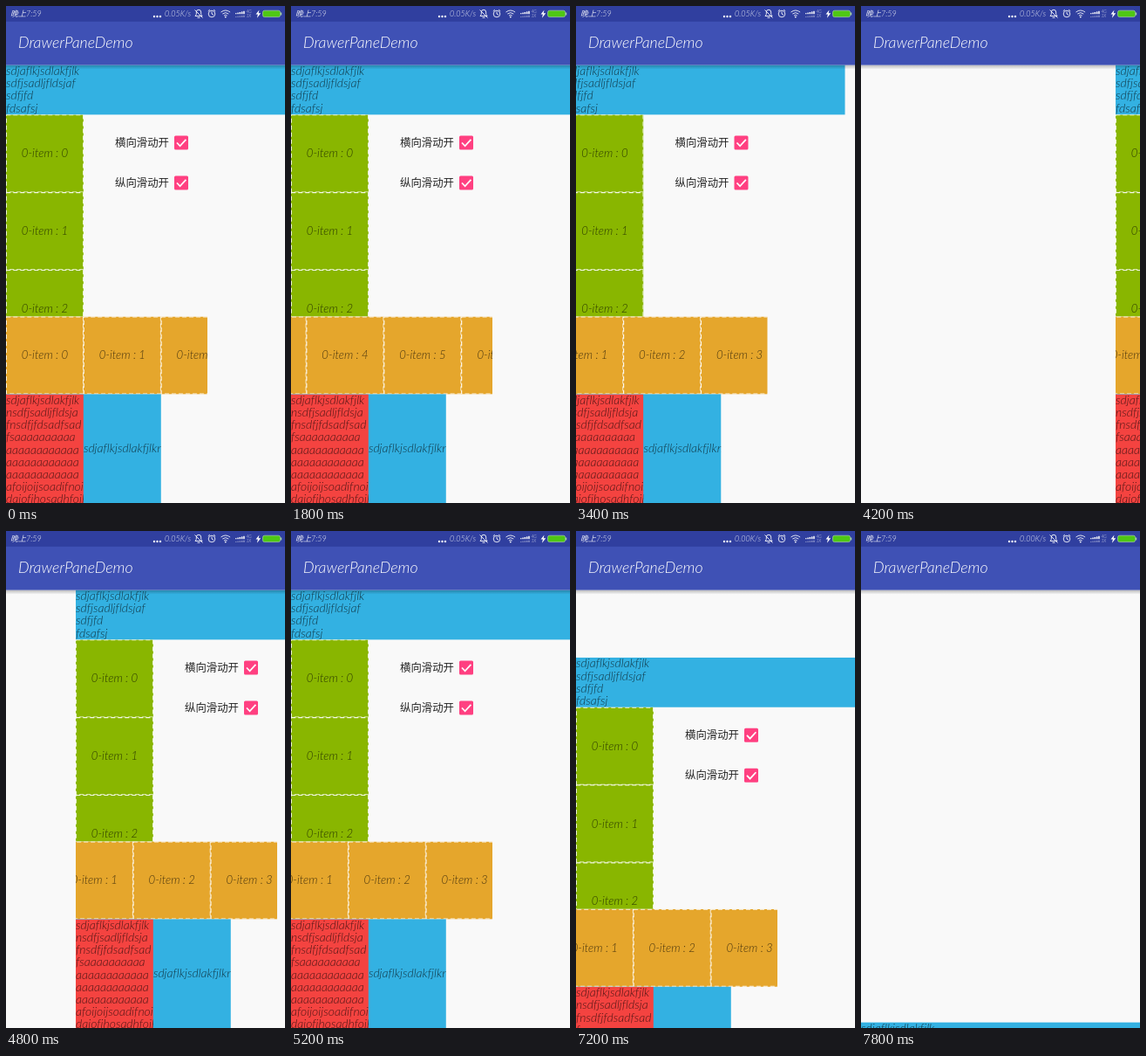
An HTML page that plays this animation: 320x569 px, repeating every 8 s.

```html
<!DOCTYPE html>
<html lang="zh">
<head>
<meta charset="utf-8">
<style>
  html, body { margin: 0; width: 100%; height: 100%; overflow: hidden; background: #f9f9f9; }
  svg { display: block; }
  text { font: italic 300 14px Lato, sans-serif; font-variant-ligatures: none; fill: #000; fill-opacity: .68; white-space: pre; }
  .title { font-size: 17.8px; fill: #fff; fill-opacity: 1; }
  .status { font-size: 9px; fill: #fff; fill-opacity: .85; }
  .label { font: 300 12.4px "Noto Sans CJK SC", "Noto Sans CJK", sans-serif; fill-opacity: .85; }
  .cell { font-size: 13.2px; text-anchor: middle; }
  .icon { fill: none; stroke: #fff; stroke-opacity: .85; stroke-width: 1; }
</style>
</head>
<body>
<svg id="stage" width="320" height="569" viewBox="0 0 320 569"></svg>
<script>
const CELL = 320 * 300 / 1080;
const LINE = 14.2;
const BAR = 67.6, LIST = 124.4, ROW = 355.5, FOOT = ROW + CELL;
const FRAME = 200, LOOP = 8000;

const rect = (x, y, w, h, fill, extra = '') =>
  `<rect x="${x}" y="${y}" width="${w}" height="${h}" fill="${fill}" ${extra}/>`;
const text = (x, y, str, cls = '') => `<text x="${x}" y="${y}" class="${cls}">${str}</text>`;
const lines = (x, y, rows) => rows.map((row, i) => text(x, y + i * LINE, row)).join('');
const clip = (x, y, w, h, body) => `<svg x="${x}" y="${y}" width="${w}" height="${h}">${body}</svg>`;

// A strip of dashed cells running along (dx, dy)
const strip = (id, fill, dx, dy) => `<g id="${id}">` + Array.from({ length: 10 }, (_, i) =>
  `<g transform="translate(${i * CELL * dx} ${i * CELL * dy})">
    ${rect(0, 0, CELL + .3, CELL + .3, fill)}
    ${rect(.3, .3, CELL - .6, CELL - .6, 'none', 'stroke="#fff" stroke-opacity=".9" stroke-width="1.2" stroke-dasharray="5 3"')}
    ${text(CELL / 2, CELL / 2 + 4.5, '0-item : ' + i, 'cell')}
  </g>`).join('') + '</g>';

const option = (y, label) => text(125, y + 4.5, label, 'label') +
  rect(193, y - 8, 16, 16, '#ff4081', 'rx="1.5"') +
  `<path d="M196 ${y}l3.6 3.8 6.8-7.4" fill="none" stroke="#fff" stroke-width="1.8"/>`;

const longRow = 'a'.repeat(12);
const content = `<g id="content">
  ${rect(0, BAR, 320, LIST - BAR, '#33b1e2')}
  ${lines(0, 79, ['sdjaflkjsdlakfjlk', 'sdfjsadljfldsjaf', 'sdfjfd', 'fdsafsj'])}
  ${clip(0, LIST, CELL, ROW - LIST, strip('column', '#89b600', 0, 1))}
  ${clip(0, ROW, 231, CELL, strip('row', '#e5a62c', 1, 0))}
  ${option(156.5, '横向滑动开')}
  ${option(202.5, '纵向滑动开')}
  ${rect(0, FOOT, CELL * 2, 125, '#33b1e2')}
  ${clip(CELL, FOOT, CELL, 125, text(0, 66.5, 'sdjaflkjsdlakfjlknsdf'))}
  ${clip(0, FOOT, CELL, 125, rect(0, 0, CELL, 125, '#f44340') + lines(0, 11.4, [
    'sdjaflkjsdlakfjlk', 'nsdfjsadljfldsja', 'fnsdfjfdsadfsad', 'fs' + 'a'.repeat(10),
    longRow, longRow, longRow, 'afoijoijsoadifnois', 'dajofjhosadhfoih']))}
</g>`;

const signal = [0, 1, 2, 3, 4].map(i =>
  rect(263 + i * 2.3, 8.2 - i * .6, 1.5, 1 + i * .6, '#fff') +
  rect(263 + i * 2.3, 12 - i * .3, 1.5, .8 + i * .3, '#fff', 'opacity=".45"')).join('');

const bars = `
  <linearGradient id="shade" x2="0" y2="1">
    <stop stop-color="#000" stop-opacity=".25"/><stop offset="1" stop-color="#000" stop-opacity="0"/>
  </linearGradient>
  ${rect(0, BAR, 320, 5, 'url(#shade)')}
  ${rect(0, 0, 320, BAR, '#3f51b5')}
  ${rect(0, 0, 320, 17.8, '#303f9f')}
  ${text(14, 48, 'DrawerPaneDemo', 'title')}
  ${text(5, 12, '晚上7:59', 'status')}
  ${[170, 173.5, 177].map(x => `<circle cx="${x}" cy="12" r="1.2" fill="#fff"/>`).join('')}
  <text id="speed" class="status" x="182" y="12"></text>
  <path class="icon" d="M217 11.5h8l-1.3-2V7a2.7 2.7 0 0 0-5.4 0v2.5zM219.5 13.3h3M216.5 4.5l9 9"/>
  <path class="icon" d="M236 6.5V9l2 1.2M231.8 5.8l2-1.6M240.2 5.8l-2-1.6"/>
  <circle class="icon" cx="236" cy="9" r="3.8"/>
  <path class="icon" d="M246.5 7q5.3-4 10.6 0M248.3 9q3.5-2.6 7 0M250 11q1.8-1.4 3.6 0"/>
  <circle cx="251.8" cy="12.6" r=".9" fill="#fff"/>
  ${signal}
  <g transform="translate(275.5 8) scale(.55)">${text(0, 0, '4G', 'status')}${text(0, 9, '1X', 'status')}</g>
  <path d="M290.5 4.5l-4 5h2.4l-1 4.2 4.3-5.5h-2.6z" fill="#fff"/>
  ${rect(294.5, 5.2, 20, 7.4, '#4fc814', 'rx="2" stroke="#a5cfa5" stroke-width=".7"')}
  ${rect(315, 7.5, 1.2, 3, '#a5cfa5')}`;

const stage = document.getElementById('stage');
stage.innerHTML = rect(0, 0, 320, 569, '#f9f9f9') + content + bars +
  '<circle id="touch" cx="47.5" r="9" fill="#fff" fill-opacity=".22"/>';
const el = id => document.getElementById(id);

// Eased motion through [time, value] pairs
function track(t, keys) {
  const next = keys.findIndex(key => key[0] > t);
  if (next < 0) return keys[keys.length - 1][1];
  if (next === 0) return keys[0][1];
  const [t0, v0] = keys[next - 1], [t1, v1] = keys[next];
  const p = (t - t0) / (t1 - t0);
  return v0 + (v1 - v0) * p * p * (3 - 2 * p);
}

const rowKeys = [[700, 0], [1800, 338], [2100, 338], [2800, 112]];
const columnKeys = [[5200, 0], [6000, 307], [6300, 307], [7000, 0]];
const panXKeys = [[2700, 0], [3100, -70], [3400, -11.5], [4200, 292], [4800, 80], [5200, 0]];
const panYKeys = [[7000, 0], [7800, 495]];

const move = (id, x, y) => el(id).setAttribute('transform', `translate(${x} ${y})`);

function draw(now) {
  const t = Math.floor(now % LOOP / FRAME) * FRAME;
  const scroll = track(t, columnKeys);
  move('content', track(t, panXKeys), track(t, panYKeys));
  move('row', -track(t, rowKeys), 0);
  move('column', 0, -scroll);
  el('touch').setAttribute('cy', 212 + 307 - scroll);
  el('touch').setAttribute('visibility', t >= 5800 && t <= 6000 ? 'visible' : 'hidden');
  el('speed').textContent = t < 7000 ? '0.05K/s' : '0.00K/s';
}

const start = performance.now();
function tick() {
  draw(performance.now() - start);
  requestAnimationFrame(tick);
}
tick();
</script>
</body>
</html>
```
